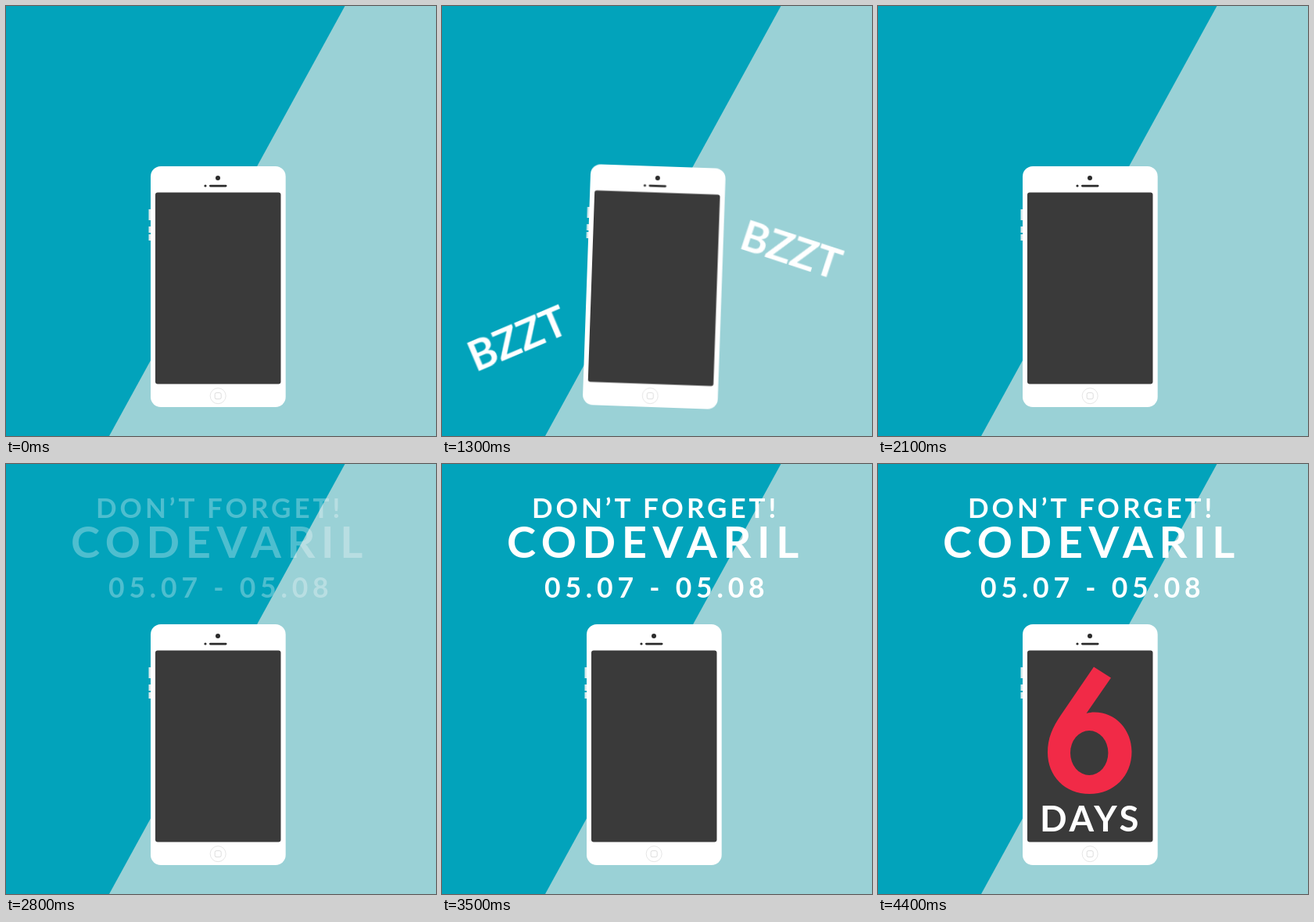
Recreate the animation shown at these times as an HTML page. Size 550 by 550 pixels, loop 7 s.

```html
<!DOCTYPE html>
<html lang="en">
<head>
<meta charset="utf-8">
<title>Event reminder</title>
<style>
  html, body { margin: 0; width: 100%; height: 100%; overflow: hidden; background: #02a3bb; }
  svg { display: block; width: 100vw; height: 100vh; }
  text { font-family: Lato, sans-serif; font-weight: 700; fill: #fff; }
  #phone { transform-origin: 271.3px 359px; }
  #buzz, #title, #count { opacity: 0; }
  #buzz text { font-size: 54px; letter-spacing: -.5px; }
</style>
</head>
<body>
<svg viewBox="0 0 550 550">
  <rect width="550" height="550" fill="#02a3bb"/>
  <path d="M433.5 0H550V550H132Z" fill="#9ad1d6"/>

  <g id="title">
    <text x="115" y="69" font-size="35" letter-spacing="4">DON’T FORGET!</text>
    <text x="83" y="120" font-size="56" letter-spacing="7.6">CODEVARIL</text>
    <text x="131" y="170.5" font-size="35.5" letter-spacing="5.8">05.07 - 05.08</text>
  </g>

  <g id="phone">
    <path d="M182.5 260h3v14h-3zM182.5 282h3v8h-3zM182.5 292h3v8h-3z" fill="#dcecee"/>
    <rect x="185" y="205" width="172.7" height="308" rx="13" fill="#fff"/>
    <rect x="191" y="238.5" width="160.5" height="245" rx="3" fill="#3a3a3a"/>
    <g fill="#2b2b2b">
      <circle cx="271" cy="220" r="3"/>
      <circle cx="255" cy="230" r="1.6"/>
      <rect x="260" y="228.7" width="22.5" height="2.7" rx="1.3"/>
    </g>
    <g fill="none" stroke="#e6e6e6">
      <circle cx="271.2" cy="498.7" r="10"/>
      <rect x="267.2" y="494.7" width="8" height="8" rx="2" stroke="#dcdcdc"/>
    </g>
    <g id="buzz">
      <text transform="translate(50.9 474.8) rotate(-25)" x="-4">BZZT</text>
      <text transform="translate(381.3 307.1) rotate(16.2)" x="-5">BZZT</text>
    </g>
  </g>

  <g id="count">
    <path role="img" aria-label="6" fill="#f12a47" fill-rule="evenodd"
      d="M276 259.5L298 273.5L266.5 319C270 318 273 317.5 277 317.5C304 317.5 324.5 340 324.5 368
         C324.5 399 302 422 270.5 422C239 422 217 399 217 369C217 351 223 337 234 321Z
         M246 369.5a24.2 28.5 0 1 0 48.4 0a24.2 28.5 0 1 0 -48.4 0Z"/>
    <text x="207" y="469.5" font-size="45.5" letter-spacing="3.8">DAYS</text>
  </g>
</svg>
<script>
const LOOP = 7000;

// Plays [time, value] steps; each value holds until the next.
function play(id, prop, steps) {
  const frames = [...steps, [LOOP, steps.at(-1)[1]]].map(([time, value]) =>
    ({ offset: time / LOOP, [prop]: value, easing: 'step-end' }));
  document.getElementById(id).animate(frames, { duration: LOOP, iterations: Infinity });
}

// Opacity ramp in 100 ms steps through [time, opacity] stops.
function fade(stops) {
  const steps = [[0, 0]];
  for (let i = 1; i < stops.length; i++) {
    const [t0, a] = stops[i - 1], [t1, b] = stops[i];
    for (let t = t0 + 100; t <= t1; t += 100) {
      steps.push([t, a + (b - a) * (t - t0) / (t1 - t0)]);
    }
  }
  return steps;
}

const shake = [[0, 'rotate(0deg)']];
for (let i = 0; i < 8; i++) shake.push([500 + i * 200, `rotate(${i % 2 ? -1 : 2}deg)`]);
shake.push([2100, 'rotate(0deg)']);

play('phone', 'transform', shake);
play('buzz', 'opacity', [[0, 0], [500, 1], [2100, 0]]);
play('title', 'opacity', fade([[2500, 0], [3500, 1]]));
play('count', 'opacity', fade([[3500, 0], [4000, .5], [4400, 1]]));
</script>
</body>
</html>
```
